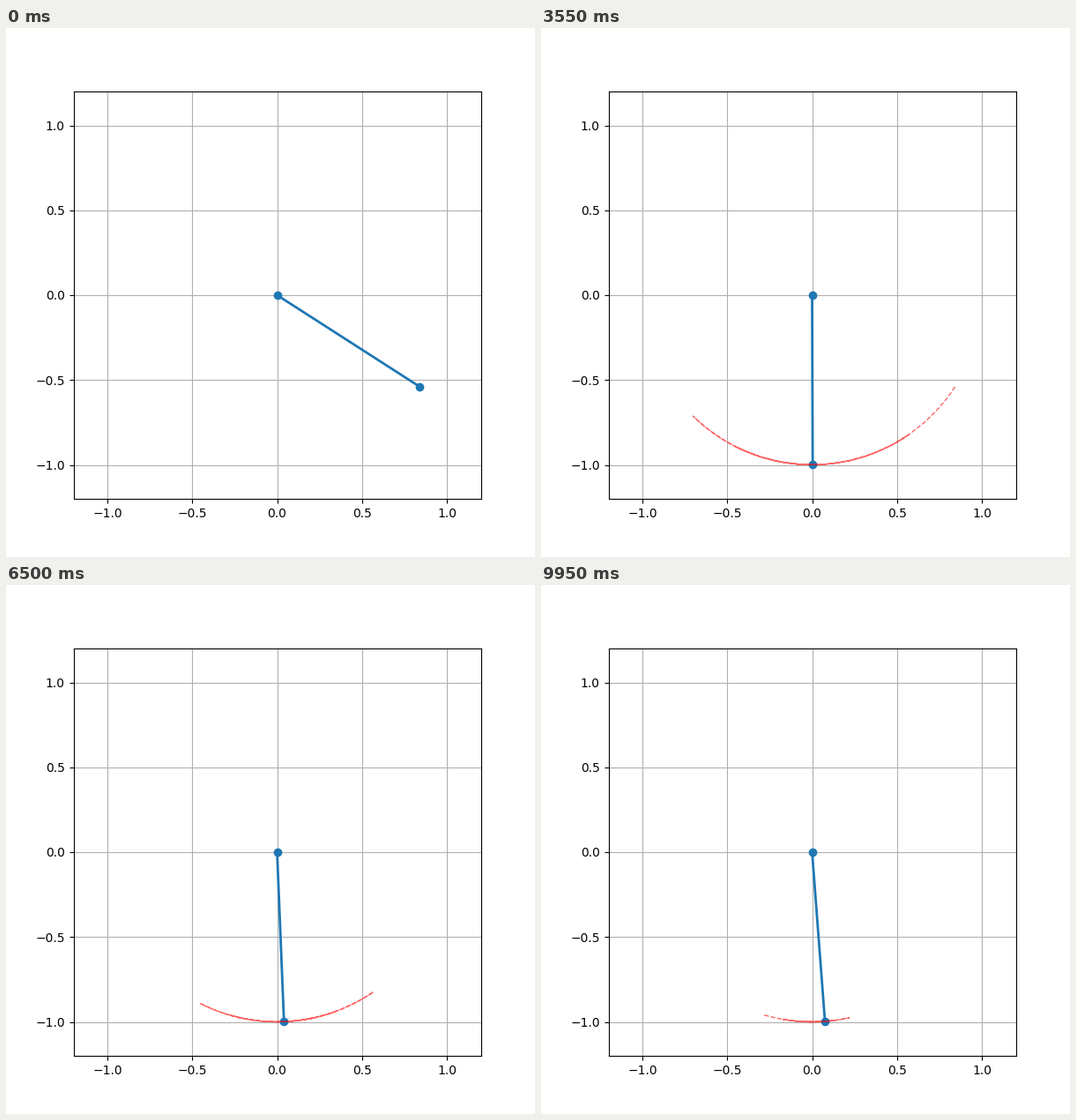
Animation of 600x600 px, one loop 10 s. Source, as a matplotlib script:

```python
import numpy as np
import matplotlib.pyplot as plt
from matplotlib.animation import FuncAnimation

GRAVITY = 9.81
LENGTH = 1.0
DAMPING = 0.5
START_ANGLE = 1.0
STEP = 0.05        # seconds per frame
FRAMES = 200
TRAIL = 100        # points kept in the trail

# Small-angle damped pendulum released from rest
t = np.arange(FRAMES) * STEP
decay = DAMPING / 2
omega = np.sqrt(GRAVITY / LENGTH - decay**2)
theta = START_ANGLE * np.exp(-decay * t) * (
    np.cos(omega * t) + decay / omega * np.sin(omega * t))
x = LENGTH * np.sin(theta)
y = -LENGTH * np.cos(theta)

fig, ax = plt.subplots(figsize=(6, 6), dpi=100)
ax.set_xlim(-1.2, 1.2)
ax.set_ylim(-1.2, 1.2)
ax.set_aspect("equal")
ax.grid()

rod, = ax.plot([], [], "o-", lw=2)
trail, = ax.plot([], [], "r--", lw=1, alpha=0.6)


def update(i):
    first = max(0, i - TRAIL + 1)
    rod.set_data([0, x[i]], [0, y[i]])
    trail.set_data(x[first:i + 1], y[first:i + 1])
    return rod, trail


def init():
    return update(0)


anim = FuncAnimation(fig, update, frames=FRAMES, init_func=init,
                     interval=STEP * 1000, repeat=True, repeat_delay=0)
plt.show()
```
